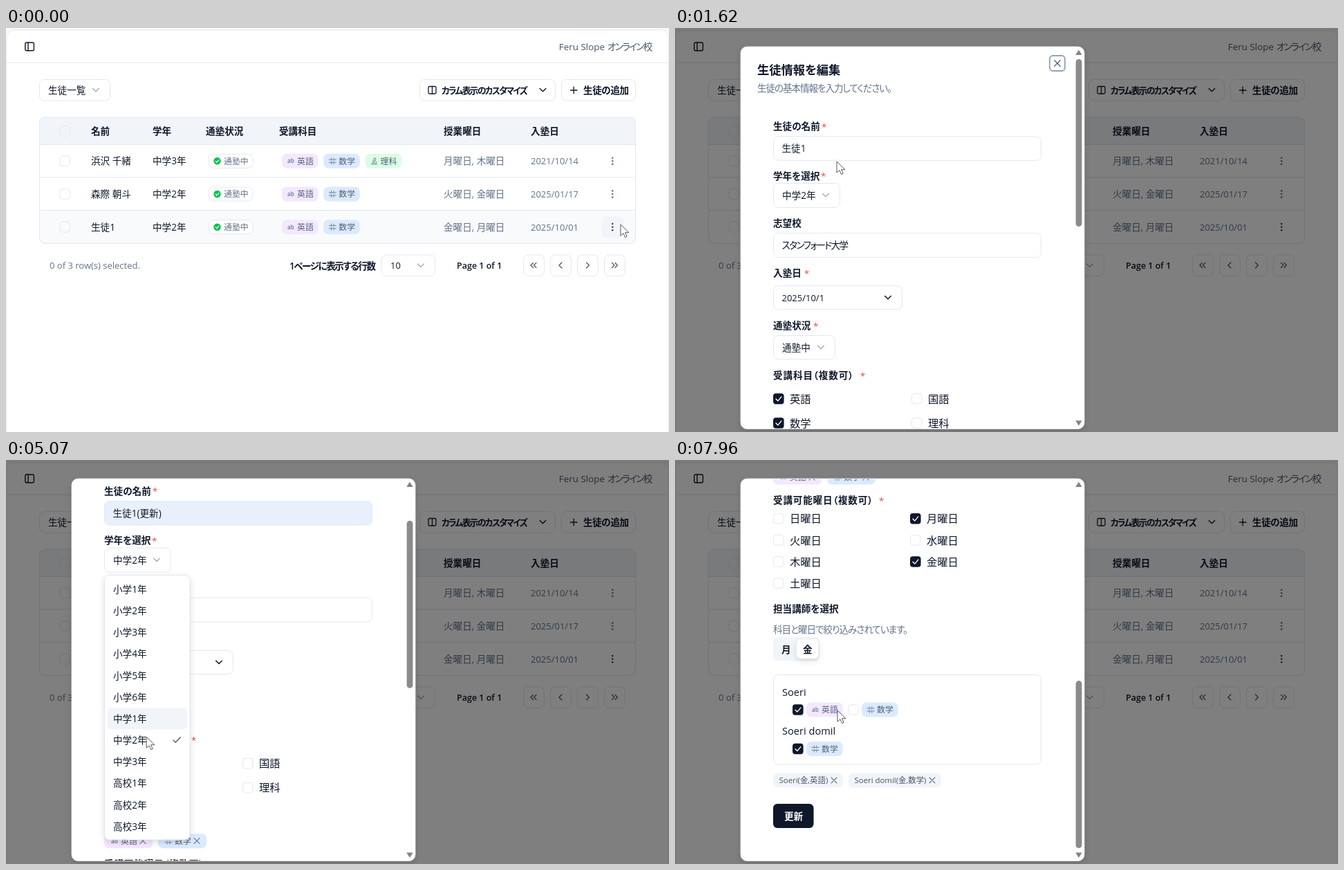
An HTML page for the animation above (8000 ms loop, 959x584 px).

```html
<!DOCTYPE html>
<html lang="ja">
<head>
<meta charset="utf-8">
<title>生徒一覧</title>
<style>
html, body { margin: 0; width: 100%; height: 100%; overflow: hidden; background: #f8f8f9; }
svg { display: block; width: 100vw; height: 100vh; font-family: "Open Sans", "Noto Sans CJK JP", "Noto Sans CJK", sans-serif; font-feature-settings: "palt"; }
text { white-space: pre; }
.pop { filter: drop-shadow(0 3px 4px #0002); }
</style>
</head>
<body>
<svg id="stage" viewBox="0 0 959 584"></svg>
<script>
const INK = '#0f172a', MUTED = '#64748b', LINE = '#e2e8f0', SOFT = '#f1f5f9';
const LOOP = 8000, STEP = 67.4;

// Drawing helpers; text and controls are placed by their vertical centre.
const text = (x, y, s, { size = 13.6, fill = INK, weight = 400, gap = 0, anchor = 'start', id = '' } = {}) =>
  `<text ${id && `id="${id}"`} x="${x}" y="${y + size * .37}" font-size="${size}" fill="${fill}" font-weight="${weight}" letter-spacing="${gap}" text-anchor="${anchor}">${s}</text>`;
const bold = (x, y, s, gap = 0, size = 13.6) => text(x, y, s, { weight: 600, gap, size });
const rect = (x, y, w, h, r = 0, fill = '#fff', stroke = 'none', extra = '') =>
  `<rect x="${x}" y="${y}" width="${w}" height="${h}" rx="${r}" fill="${fill}" stroke="${stroke}" ${extra}/>`;
const path = (d, stroke = INK, width = 1.2, extra = '') =>
  `<path d="${d}" fill="none" stroke="${stroke}" stroke-width="${width}" stroke-linecap="round" stroke-linejoin="round" ${extra}/>`;
const group = (id, body, extra = '') => `<g id="${id}" ${extra}>${body}</g>`;
const box = (x, y, w, h, r = 7) => rect(x + .5, y + .5, w - 1, h - 1, r, '#fff', LINE);
const chevron = (x, y, color = '#94a3b8', width = 1.2) => path(`M${x - 4.3} ${y - 2}l4.3 4.3 4.3-4.3`, color, width);
const cross = (x, y, r = 4, color = MUTED) => path(`M${x - r} ${y - r}l${2 * r} ${2 * r}m0 ${-2 * r}l${-2 * r} ${2 * r}`, color, 1.1);
const checkbox = (x, y, on) => on
  ? rect(x, y - 7.8, 15.6, 15.6, 4, INK) + path(`M${x + 4} ${y + .3}l2.8 2.8 5-6`, '#fff', 1.4)
  : rect(x + .5, y - 7.3, 14.6, 14.6, 4, 'none', LINE);
const option = (x, y, s, on) => checkbox(x, y, on) + text(x + 24, y, s, { size: 15.3 });
const label = (y, s, star, gap = 0) =>
  bold(142, y, s, gap) + (star ? text(star, y + 1, '*', { size: 13, fill: '#ef4444' }) : '');

const SUBJECTS = {
  en: ['英語', '#f3e8ff'],
  math: ['数学', '#dbeafe', 'M0 3h2.2M4.2 3h1.6M7.8 3H10M0 7h2.2M4.2 7h1.6M7.8 7H10M3.2 .5V4M6.8 .5V4M3.2 6v3.5M6.8 6v3.5'],
  sci: ['理科', '#dcfce7', 'M.5 9.5h9M2 7.5h3.5M6.5 9.5a3 3 0 0 0 .5-5M3 5l2.5-4.5 2 1-2.5 4.5z']
};
const badge = (x, y, key, closable) => {
  const [name, fill, icon] = SUBJECTS[key], pad = closable ? 10 : 8;
  return rect(x, y - 10.5, closable ? 70 : 52.5, 21, 7, fill) +
    (icon ? path(icon, MUTED, .9, `transform="translate(${x + pad} ${y - 5})"`)
          : text(x + pad, y, 'ab', { size: 8, fill: MUTED, weight: 600 })) +
    text(x + pad + 14, y, name, { size: 11.9, fill: '#526078', weight: 500 }) +
    (closable ? cross(x + 56, y) : '');
};
const chip = (x, y, w, s) => rect(x, y - 10.5, w, 21, 7, SOFT) +
  text(x + 8.5, y, s, { size: 11.4, fill: '#475569' }) + cross(x + w - 13, y);

const row = (y, name, grade, keys, days, date, dots = MUTED) =>
  checkbox(77.5, y, false) + text(123, y, name) + text(212, y, grade) +
  rect(293, y - 10, 64, 20, 7, '#fff', LINE) +
  `<circle cx="305.5" cy="${y}" r="5.2" fill="#0cc152"/>` + path(`M303.2 ${y + .2}l1.7 1.7 3-3.4`, '#fff', 1.1) +
  text(315, y, '通塾中', { size: 11.9, fill: MUTED, weight: 500 }) +
  keys.map((k, i) => badge(399 + i * 60.3, y, k)).join('') +
  text(633, y, days, { fill: MUTED }) + text(759, y, date, { size: 13, fill: MUTED }) +
  [-4.6, 0, 4.6].map(d => `<circle cx="877.3" cy="${y + d}" r="1.3" fill="${dots}"/>`).join('');

const page =
  rect(.5, 3.5, 958, 600, 11, '#fff', '#ececee') + path('M0 50H959', '#e5e7eb', 1) +
  rect(27.8, 21, 12.6, 11.8, 2, 'none', INK, 'stroke-width="1.4"') + path('M32 21v11.8', INK, 1.4) +
  text(866, 27, 'Feru Slope', { size: 13.4, fill: '#475569', weight: 500, anchor: 'end' }) +
  text(870, 27, 'オンライン校', { fill: '#475569', weight: 500, gap: -1.75 }) +
  box(48, 74, 103, 31.5) + text(61, 90, '生徒一覧') + chevron(130, 89.5) +
  box(598, 74, 197, 31.5) + rect(611, 84.5, 11, 10.5, 1.5, 'none', INK, 'stroke-width="1.3"') + path('M616.5 84.5v10.5', INK, 1.3) +
  bold(630, 90, 'カラム表示のカスタマイズ', -1.6, 12.7) + chevron(776.5, 89.5, INK, 1.4) +
  box(803, 74, 108, 31.5) + path('M816.5 90h9.6M821.3 85.2v9.6', INK, 1.3) + bold(835, 90, '生徒の追加', -.4) +
  rect(48.5, 129, 862, 182, 8) + `<path d="M48.5 168.5V137a8 8 0 0 1 8-8H902.5a8 8 0 0 1 8 8V168.5z" fill="${SOFT}"/>` +
  group('rowHover', rect(49, 264, 861, 47, 7, '#f8fafc')) +
  group('dotsHover', rect(862, 272.5, 31, 31, 7, SOFT)) +
  [168.5, 216, 263.5].map(y => path(`M49 ${y}H910`, LINE, 1)).join('') +
  rect(48.5, 129, 862, 182.3, 8, 'none', LINE) +
  checkbox(77.5, 149, false) +
  [[123, '名前'], [212, '学年'], [289, '通塾状況'], [395, '受講科目'], [633, '授業曜日'], [759, '入塾日']]
    .map(([x, s]) => bold(x, 149, s)).join('') +
  row(192.3, '浜沢 千緒', '中学3年', ['en', 'math', 'sci'], '月曜日, 木曜日', '2021/10/14') +
  row(240, '森際 朝斗', '中学2年', ['en', 'math'], '火曜日, 金曜日', '2025/01/17') +
  row(287.7, '生徒1', '中学2年', ['en', 'math'], '金曜日, 月曜日', '2025/10/01', '#334155') +
  text(63, 343.5, '0 of 3 row(s) selected.', { size: 13, fill: MUTED }) +
  bold(410, 343.5, '1ページに表示する行数', -1.45) +
  box(543, 327.5, 78, 31.5) + text(556, 343.5, '10', { size: 13 }) + chevron(600, 343) +
  bold(652, 343.5, 'Page 1 of 1', 0, 12.5) +
  [748, 787, 826, 865].map(x => box(x, 327.5, 31, 31.5)).join('') +
  path('M762.5 339.5l-3.5 3.5 3.5 3.5m4.5-7l-3.5 3.5 3.5 3.5', '#475569') +
  path('M804 339l-4 4 4 4', '#475569') + path('M839.5 339l4 4-4 4', '#475569') +
  path('M876.5 339.5l3.5 3.5-3.5 3.5m4.5-7l3.5 3.5-3.5 3.5', '#475569');

const rowMenu = box(769, 307, 124, 79) +
  group('editHover', rect(773, 311, 116, 31, 5, SOFT)) + text(782, 327, '編集') +
  path('M769.5 346.5H892.5', LINE, 1) + text(782, 367, '削除', { fill: '#dc2626' });

const heading = (y, closeX, ringId) =>
  text(119, y, '生徒情報を編集', { size: 17.3, weight: 600 }) +
  text(119, y + 26, '生徒の基本情報を入力してください。', { fill: MUTED, gap: -1.1 }) +
  group(ringId, rect(closeX - 11, y - 21, 22, 22, 4.5, '#fff', '#94a3b8', 'stroke-width="1.8"')) + cross(closeX, y - 10, 4.3, '#334155');

const loading = rect(95, 186.5, 497, 233, 9, '#fff', LINE, 'class="pop"') +
  heading(220.5, 567.5, 'loadRing') +
  group('spinner', path('M0 -11.5A11.5 11.5 0 1 0 11.5 0', INK, 2.6)) +
  text(343.5, 350, '講師情報を読み込み中...', { size: 15.5, fill: MUTED, anchor: 'middle', gap: -.4 });

const days = '日月火水木金土';
const form = heading(61, 553, 'closeRing') +
  label(142, '生徒の名前', 212) +
  group('focus', rect(140.5, 155, 391, 38, 8.5, 'none', '#a1aec3', 'stroke-width="3.4" opacity=".6"')) +
  rect(142.5, 156.8, 387, 34.5, 7, '#fff', LINE, 'id="nameBox"') + text(154.5, 174, '生徒1', { id: 'nameText' }) +
  path('M0 166v17', INK, 1, 'id="caret"') +
  label(213.5, '学年を選択', 211) + box(142, 224, 97, 36) + text(155, 242, '中学2年', { id: 'grade' }) + chevron(218, 241.5) +
  label(282, '志望校') + box(142, 296, 388, 36) + text(154.5, 314, 'スタンフォード大学', { gap: -1.55 }) +
  label(354, '入塾日', 187) + box(142, 372.3, 187, 35) + text(154.5, 390, '2025/10/1', { size: 13 }) + chevron(308, 389.5, INK, 1.5) +
  label(430, '通塾状況', 200) + box(142, 444, 90, 35.5) + text(155, 462, '通塾中') + chevron(211, 461.5) +
  label(502, '受講科目（複数可）', 268, .9) +
  ['英語', '国語', '数学', '理科', '社会'].map((s, i) =>
    option(i % 2 ? 342 : 142, 536 + (i >> 1) * 35, s, i === 0 || i === 2)).join('') +
  badge(142, 648, 'en', true) + badge(220, 648, 'math', true) +
  label(681, '受講可能曜日（複数可）', 295, .8) +
  [...days].map((d, i) => option(i % 2 ? 340 : 142, 707.8 + (i >> 1) * 31.1, d + '曜日', d === '月' || d === '金')).join('') +
  label(838, '担当講師を選択') +
  text(142, 868, '科目と曜日で絞り込みされています。', { fill: MUTED, gap: -1.05 }) +
  rect(142, 879, 67, 34.5, 7, SOFT) + rect(176, 882.5, 31.5, 27.5, 6, '#fff', 'none', 'class="pop"') +
  bold(154, 896.5, '月') + bold(185, 896.5, '金') +
  box(142, 933, 388, 130.5) +
  text(155, 959, 'Soeri', { size: 14.6, weight: 500 }) +
  checkbox(170, 984, true) + badge(190, 984, 'en') + checkbox(250, 984, false) + badge(270, 984, 'math') +
  text(155, 1015, 'Soeri domil', { size: 14.6, weight: 500 }) +
  checkbox(170, 1040.5, true) + badge(190, 1040.5, 'math') +
  chip(142, 1086, 101, 'Soeri(金,英語)') + chip(251, 1086, 134, 'Soeri domil(金,数学)') +
  rect(142, 1120, 58.5, 35, 6, INK) + text(158, 1138, '更新', { fill: '#fff', weight: 600 });

const dialog = rect(95, 27, 497, 552.5, 9, '#fff', LINE, 'class="pop"') +
  `<g clip-path="url(#clip)">${group('form', form)}</g>` +
  '<path d="M584 31.5l4.7 7.5h-9.4zM584 575l4.7-7.5h-9.4z" fill="#858585"/>' +
  rect(579.7, 45, 8.8, 242, 4.4, '#8b8b8b', 'none', 'id="thumb"');

const grades = ['小学', '中学', '高校'].flatMap((s, i) => Array.from({ length: i ? 3 : 6 }, (_, n) => `${s}${n + 1}年`));
const gradeMenu = box(142, 166, 124.5, 383.5) + rect(147, 0, 115, 31, 5, SOFT, 'none', 'id="gradeHover"') +
  grades.map((s, i) => text(155, 187 + i * 31.15, s)).join('') +
  path('M242 405l3.3 3.3 7-7.5', '#475569', 1.3);

const $ = id => document.getElementById(id);
$('stage').innerHTML =
  `<clipPath id="clip">${rect(95.5, 27.5, 481, 551.5, 8)}</clipPath>` + page +
  group('rowMenu', rowMenu, 'class="pop"') +
  rect(0, 0, 959, 584, 0, '#000', 'none', 'id="shade"') +
  group('loading', loading) + group('dialog', dialog) + group('gradeMenu', gradeMenu, 'class="pop"') +
  '<path id="arrow" d="M0 0V16.2L4 12.7L6.6 18.6L9.2 17.5L6.6 11.7H12Z" fill="#fff" stroke="#444" stroke-width=".9" stroke-linejoin="round"/>' +
  path('M-3 -9h2.5l.5 .5 .5-.5H3M0 -8.5v17M-3 9h2.5l.5-.5 .5 .5H3', '#222', 1, 'id="beam"');

const smooth = p => (p = Math.min(1, Math.max(0, p)), p * p * (3 - 2 * p));
// Keys are [time, ...values]; values ease between neighbours.
const track = (keys, t) => {
  const n = keys.findIndex(k => k[0] > t);
  if (n < 1) return keys[n < 0 ? keys.length - 1 : 0].slice(1);
  const [a, b] = [keys[n - 1], keys[n]], p = smooth((t - a[0]) / (b[0] - a[0]));
  return a.slice(1).map((v, i) => v + (b[i + 1] - v) * p);
};
const POINTER = [[0, 889, 284], [66, 876, 283], [330, 876, 283], [900, 839, 316], [1290, 839, 316], [1600, 234, 193],
  [1660, 234, 193], [1750, 230, 181], [2630, 230, 181], [2690, 227, 197], [2890, 227, 197], [3290, 210, 168],
  [3640, 206, 138], [3780, 206, 138], [4450, 200, 213], [5050, 203, 400], [5255, 203, 425], [5320, 203, 425],
  [5460, 203, 434], [5600, 203, 434], [6190, 235, 370], [6530, 235, 370], [7300, 235, 362]];
const SCROLL = [[0, 0], [2850, 0], [3080, 97.3], [5640, 97.3], [5880, 194.7], [5930, 194.7], [6190, 292],
  [6500, 292], [6760, 389], [6960, 389], [7270, 486], [7720, 486], [7950, 623]];

const show = (id, on) => { $(id).style.opacity = +on; };
const place = (id, value) => $(id).setAttribute('transform', value);
const zoom = (id, p, cx, cy) => {
  const s = .95 + .05 * p;
  show(id, p);
  place(id, `translate(${cx * (1 - s)} ${cy * (1 - s)}) scale(${s})`);
};
const popIn = (id, t, from, to, cx, cy) =>
  zoom(id, Math.min(smooth((t - from) / 150), 1 - smooth((t - to) / 120)), cx, cy);

function draw(t) {
  const [x, y] = track(POINTER, t), [scroll] = track(SCROLL, t);
  show('rowHover', t < 200);
  show('dotsHover', t < 1070);
  popIn('rowMenu', t, 190, 1050, 877, 307);
  show('editHover', y > 309);

  show('shade', .5 * smooth((t - 1198) / 200));
  zoom('loading', t < 1480 ? smooth((t - 1218) / 200) : 0, 343.5, 303);
  place('spinner', `translate(343.5 321.5) rotate(${(t - 1280) * .36})`);
  show('dialog', t >= 1480);

  const focused = t >= 1880 && t < 3700, filled = t >= 2290;
  show('closeRing', t < 1880);
  show('focus', focused);
  $('nameBox').setAttribute('fill', filled ? '#e8f0fe' : '#fff');
  $('nameBox').setAttribute('stroke', focused ? '#94a3b8' : LINE);
  $('nameText').textContent = filled ? '生徒1(更新)' : '生徒1';
  place('caret', `translate(${154.5 + $('nameText').getComputedTextLength()} 0)`);
  show('caret', focused && (t < 2690 || t > 3220));
  $('grade').textContent = t < 5590 ? '中学2年' : '中学3年';
  place('form', `translate(0 ${-scroll})`);
  $('thumb').setAttribute('y', 45 + scroll * .44);

  popIn('gradeMenu', t, 3690, 5590, 190, 166);
  const late = track(POINTER, t - 135)[1];
  const hovered = late < 171 ? 7 : Math.round((late - 187) / 31.15);
  $('gradeHover').setAttribute('y', 171.5 + hovered * 31.15);

  const typing = t >= 1740 && t < 2650;
  show('beam', typing);
  show('arrow', !typing);
  for (const id of ['beam', 'arrow']) place(id, `translate(${x} ${y})`);
}

// Motion advances in steps of about fifteen per second.
const start = performance.now();
function tick() {
  const t = (performance.now() - start) % LOOP;
  draw(Math.floor((t + 10) / STEP) * STEP);
  requestAnimationFrame(tick);
}
tick();
</script>
</body>
</html>
```
